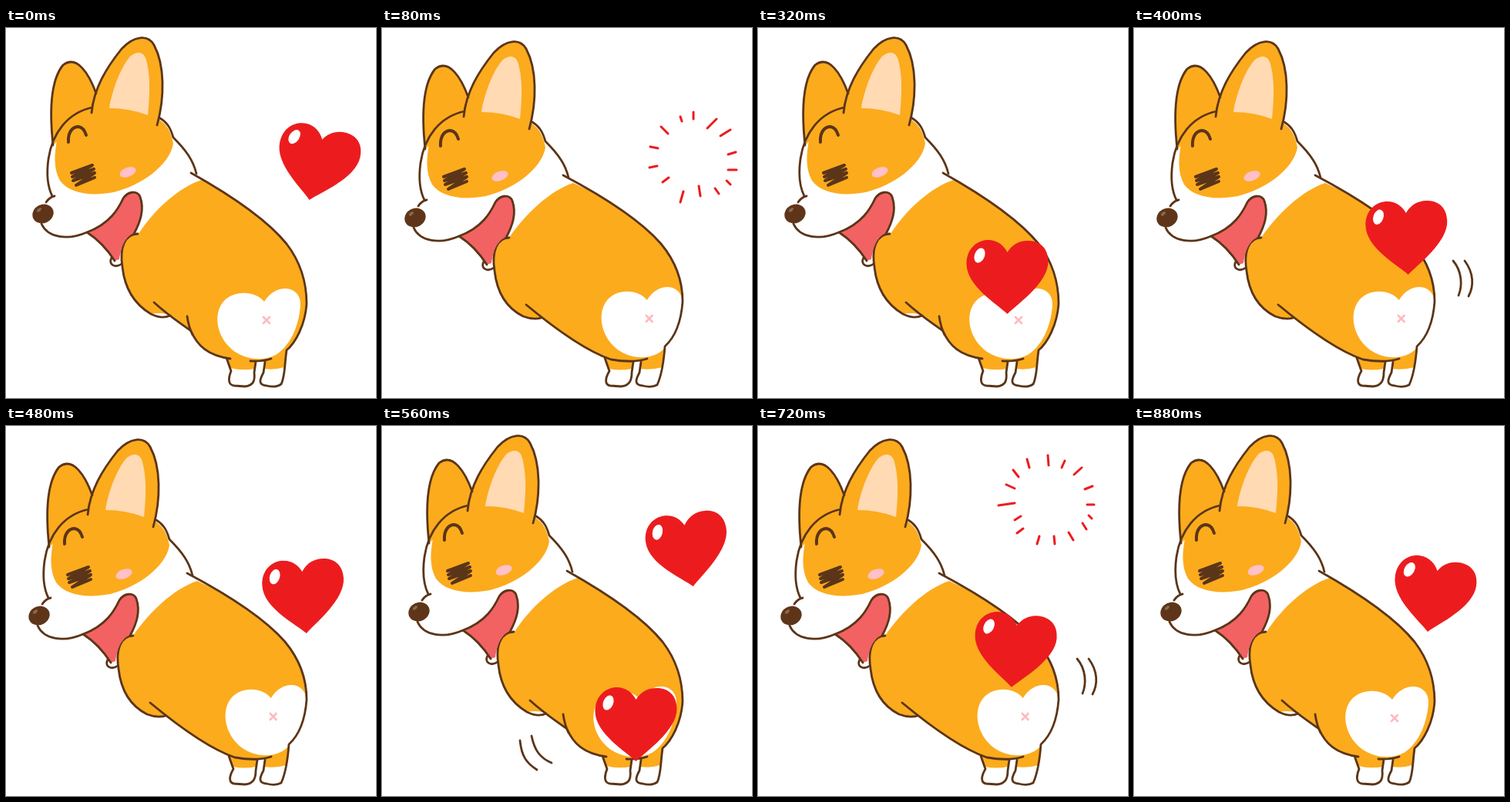
An HTML page that plays this animation: 480 by 480 pixels, repeating every 0.96 s.

```html
<!DOCTYPE html>
<html lang="en">
<head>
<meta charset="utf-8">
<title>Happy corgi</title>
<style>
  html, body { margin: 0; width: 100%; height: 100%; overflow: hidden; background: #fff; }
  svg { display: block; width: 100vw; height: 100vh; }
  .line { fill: none; stroke: #5b3518; stroke-width: 2.8; stroke-linecap: round; stroke-linejoin: round; }
  .thick { stroke-width: 4; }
  .fur { fill: #fcab1d; }
  .spark { fill: none; stroke: #ec1c1e; stroke-width: 3; stroke-linecap: round; }
</style>
</head>
<body>
<svg viewBox="0 0 480 480">
  <defs>
    <g id="rump">
      <path fill="#fff" d="M335 355C324 341 296 339 282 355C268 372 274 400 292 416C306 429 332 434 350 424C371 411 381 382 382 358C382 334 350 330 335 355Z"/>
      <path d="M334 375l8 8m0-8l-8 8" stroke="#ffb9be" stroke-width="2.6" stroke-linecap="round"/>
    </g>
    <g id="heart">
      <path fill="#ec1c1e" d="M0 48C-12 36-53 12-53-17C-53-38-38-48-25-48C-12-48-4-40 0-32C6-42 16-48 29-47C42-46 53-38 53-20C53 8 12 36 0 48Z"/>
      <ellipse rx="6.5" ry="10" fill="#fff" transform="translate(-36 -28) rotate(22)"/>
    </g>
  </defs>

  <g id="bodyUp">
    <path class="fur" d="M254 197C290 216 338 248 364 280C384 306 390 335 390 358C388 385 376 408 364 418L361 440Q348 444 335 442L336 432H323V442Q306 445 291 441L286 428C262 424 246 412 240 393C226 384 222 380 212 373Q204 368 188 371C166 358 154 338 152 310C146 285 156 268 172 267C192 236 225 206 254 197Z"/>
    <use href="#rump"/>
    <path class="line" d="M240 188C290 216 338 248 364 280C384 306 390 335 390 358C388 385 376 408 364 418C361 440 362 452 357 462Q350 467 338 464C328 463 328 458 334 447L336 433M171 267C154 267 147 285 151 310C154 338 166 358 188 371Q202 378 213 373M192 356C212 374 222 380 240 393C248 412 262 425 291 429M235 374Q237 388 242 398M317 432Q332 433 344 429M286 428L292 445C288 455 288 463 296 464L310 465C322 464 323 456 322 447L324 433"/>
  </g>
  <g id="bodyDown">
    <path class="fur" d="M248 201C290 220 336 250 362 280C382 304 390 330 390 355C388 382 379 402 367 413L364 440Q350 444 335 442L336 431H325L324 442Q310 445 294 442L289 428C262 418 228 393 206 376Q196 379 186 375C162 364 149 342 147 315C141 290 151 274 165 272C185 242 218 211 248 201Z"/>
    <use href="#rump" transform="translate(17.5 -2) scale(.974 1)"/>
    <path class="line" d="M235 191C288 219 336 250 362 280C382 304 390 330 390 355C388 382 379 402 367 413C365 440 362 452 357 463Q350 467 338 464C328 463 328 458 334 447L336 433M165 272C149 272 142 290 146 315C149 342 161 363 183 374Q196 379 207 376M187 359C222 388 262 418 297 430Q325 435 344 429M289 428L295 445C289 455 289 463 296 464L310 465C322 464 324 456 324 447L326 433"/>
  </g>

  <g id="head">
    <path class="fur" d="M61 152C57 115 56 70 74 48C92 34 108 60 117 85L112 108Z"/>
    <path class="fur" d="M66 146C78 120 95 106 112 103L198 118C209 126 213 132 217 150C212 178 176 204 140 213C108 219 82 214 70 198C61 182 63 162 66 146Z"/>
    <path class="fur" d="M111 110C114 78 130 52 150 27C166 10 184 8 192 22C206 48 206 90 196 126Z"/>
    <path fill="#ffdab3" d="M134 104C138 78 151 47 162 36C173 28 181 32 183 46C188 68 186 92 184 113Q160 104 134 104Z"/>
    <path fill="#f26262" d="M105 265C135 254 146 234 152 221C158 212 170 210 174 219C180 236 174 252 166 266C152 272 149 288 147 300L141 302C132 288 122 276 105 265Z"/>
    <path class="line" d="M61 152C57 115 56 70 74 48C92 34 108 60 117 85M111 110C114 78 130 52 150 27C166 10 184 8 192 22C206 48 206 90 196 126M112 103C80 110 60 136 55 170C52 192 54 206 60 218M63 218Q57 219 52 226M46 254C54 272 80 276 105 265C135 254 146 234 152 221C158 212 170 210 174 219C180 236 174 252 166 267M105 265C122 276 132 288 141 302M137 298C132 307 142 312 150 306M200 117C211 124 214 132 217 142C234 159 243 172 247 189"/>
    <path class="line thick" d="M81 148C80 133 88 128 94 128Q101 129 104 139M85 188L112 178L86 193L114 183L87 198L115 188L91 204L115 194"/>
    <ellipse rx="11" ry="6" fill="#ffc0c8" transform="translate(158 187) rotate(-20)"/>
    <ellipse rx="14" ry="12" fill="#5f3519" transform="translate(48 241) rotate(-25)"/>
    <ellipse rx="3.5" ry="1.8" fill="#8d6a4d" transform="translate(43 236) rotate(-40)"/>
  </g>

  <path id="swishLeft" class="line" d="M179 408C181 428 187 437 201 446M194 402C198 422 206 431 220 437"/>
  <path id="swishRight" class="line" d="M414 302C426 316 426 335 421 347M429 302C441 318 441 335 434 348"/>
  <path id="popRight" class="spark" d="M387 115l2 6M404 109v9M434 118l-12 12M452 132l-13 8M459 161l-10 3M460 184h-11M447 198l5 5M432 208l5 7M411 205l2 13M387 226l4-14M364 200l8-6M347 181l10-2M348 154l10 2M362 128l9 9"/>
  <path id="popTop" class="spark" d="M349 43l3 11M376 38l1 13M398 45l-4 9M420 54l-10 9M434 78l-10 4M436 102h-9M429 116l4 4M421 126l5 8M403 138l6 10M384 143l1 10M365 143l-3 10M336 139l8-6M333 122l8-5M312 103l21-3M322 76l11 5M331 57l7 9"/>
  <use id="heartA" href="#heart"/>
  <use id="heartB" href="#heart"/>
</svg>
<script>
const STEP = 80, STEPS = 12;
const el = id => document.getElementById(id);
const show = (id, on) => el(id).style.display = on ? '' : 'none';

// x, y, tilt for each step of a heart's rise
const leftTurn = [[329, 387, 0], [323.5, 323, 0], [354, 272, -2], [386.5, 221, -4], [397, 160.5, -8], [378, 98, -10]];
const rightTurn = [[329.5, 387, 0], [325, 338, 2], [333, 291, 5], [361, 255, 7], [388.5, 219.5, 9], [403.5, 176, 12]];

function placeHeart(id, path, age) {
  const spot = path[age];
  show(id, spot);
  if (spot) el(id).setAttribute('transform', `translate(${spot[0]} ${spot[1]}) rotate(${spot[2]})`);
}

function draw(now) {
  const step = Math.floor(now / STEP) % STEPS;
  const down = step % 4 === 1 || step % 4 === 2;
  show('bodyUp', !down);
  show('bodyDown', down);
  el('head').setAttribute('transform', down ? 'translate(-5 5)' : '');
  show('swishLeft', step === 3 || step === 7);
  show('swishRight', step === 5 || step === 9);
  show('popRight', step === 1);
  show('popTop', step === 9);
  placeHeart('heartA', leftTurn, (step + 9) % STEPS);
  placeHeart('heartB', rightTurn, (step + 5) % STEPS);
}

let start;
function tick(now) {
  start ??= now;
  draw(now - start);
  requestAnimationFrame(tick);
}
draw(0);
requestAnimationFrame(tick);
</script>
</body>
</html>
```
